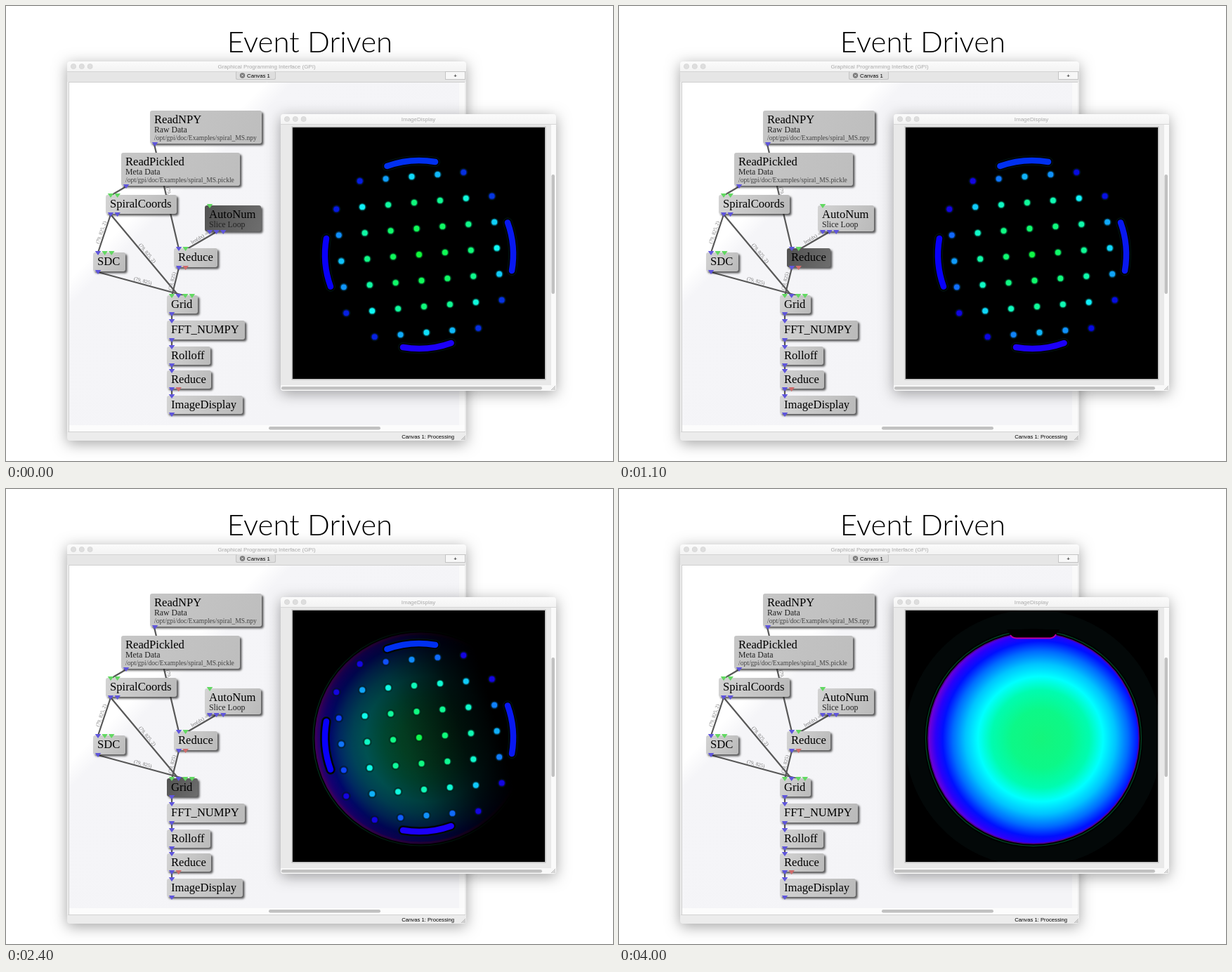
Write an HTML page with a canvas that moves like this. It is 864x648 px and loops after 4100 ms.

```html
<!DOCTYPE html>
<html lang="en">
<head>
<meta charset="utf-8">
<title>Event Driven</title>
<style>
  html, body { margin: 0; width: 864px; height: 648px; overflow: hidden; background: #fff; }
  canvas { display: block; }
</style>
</head>
<body>
<canvas id="stage" width="864" height="648"></canvas>
<script>
const ctx = document.getElementById('stage').getContext('2d');
const SANS = '"Liberation Sans", Arial, sans-serif';
const SERIF = '"Liberation Serif", "Times New Roman", serif';
const TAU = Math.PI * 2;

// Which node is busy in each 100 ms step (hex index into nodes), and when a new slice appears.
const STEP = 100, LOOP = 4100;
const busySteps = '356666789a' + '356666789aa' + '35666789a' + '356666789a' + '-';
const sliceStarts = [1000, 2100, 3000, 4000];

// x, y, width, height, title, subtitle, path
const nodes = [
  [205, 149, 159, 47, 'ReadNPY', 'Raw Data', '/opt/gpi/doc/Examples/spiral_MS.npy'],
  [164, 209, 169, 47, 'ReadPickled', 'Meta Data', '/opt/gpi/doc/Examples/spiral_MS.pickle'],
  [142, 269, 101, 27, 'SpiralCoords'],
  [283, 284, 80, 37, 'AutoNum', 'Slice Loop'],
  [124, 351, 46, 27, 'SDC'],
  [239, 345, 62, 27, 'Reduce'],
  [229, 412, 44, 26, 'Grid'],
  [229, 448, 111, 27, 'FFT_NUMPY'],
  [229, 485, 62, 26, 'Rolloff'],
  [229, 519, 63, 26, 'Reduce'],
  [229, 555, 108, 26, 'ImageDisplay']
];

// Ports per node: inputs on top, outputs below; p purple, g green, r red
const ports = [
  ['', 'p'], ['', 'p'], ['gg', 'pp'], ['g', 'ppp'], ['pgg', 'p'], ['pg', 'pr'],
  ['gpgg', 'p'], ['p', 'p'], ['p', 'p'], ['p', 'pr'], ['p', 'p']
];
const portColors = { p: '#5f55dc', g: '#62d862', r: '#cf6b6b' };

const edges = [
  [211, 197, 246, 346, '(79, 825)'],
  [171, 257, 149, 270],
  [149, 297, 131, 351, '(79, 825, 2)'],
  [149, 297, 246, 413, '(79, 825, 2)'],
  [131, 379, 256, 413, '(79, 825)'],
  [246, 373, 236, 413, '(79, 825)'],
  [299, 322, 256, 347, 'len(dx) ='],
  [236, 438, 236, 582]
];

function rect(x, y, w, h, fill, radius = 0) {
  ctx.beginPath();
  ctx.roundRect(x, y, w, h, radius);
  ctx.fillStyle = fill;
  ctx.fill();
}

function circle(x, y, r, fill) {
  ctx.beginPath();
  ctx.arc(x, y, r, 0, TAU);
  ctx.fillStyle = fill;
  ctx.fill();
}

function text(str, x, y, font, fill = '#000', align = 'left') {
  ctx.font = font;
  ctx.fillStyle = fill;
  ctx.textAlign = align;
  ctx.fillText(str, x, y);
}

function line(x1, y1, x2, y2, color, width) {
  ctx.beginPath();
  ctx.moveTo(x1, y1);
  ctx.lineTo(x2, y2);
  ctx.strokeStyle = color;
  ctx.lineWidth = width;
  ctx.stroke();
}

function linear(x1, y1, x2, y2, stops) {
  const g = ctx.createLinearGradient(x1, y1, x2, y2);
  stops.forEach(([at, color]) => g.addColorStop(at, color));
  return g;
}

function withShadow(color, blur, dx, dy, draw) {
  ctx.save();
  ctx.shadowColor = color;
  ctx.shadowBlur = blur;
  ctx.shadowOffsetX = dx;
  ctx.shadowOffsetY = dy;
  draw();
  ctx.restore();
}

function windowFrame(x, y, w, h, title) {
  withShadow('rgba(0,0,0,.36)', 20, 0, 4, () => rect(x, y, w, h, '#ececec', 4));
  rect(x, y, w, 14, linear(0, y, 0, y + 14, [[0, '#fbfbfb'], [1, '#f3f3f3']]), [4, 4, 0, 0]);
  for (let i = 0; i < 3; i++) {
    circle(x + 9 + i * 11.8, y + 7, 3.8, '#cfcfcf');
    circle(x + 9 + i * 11.8, y + 7, 3.2, '#dedede');
  }
  text(title, x + w / 2, y + 10, '8px ' + SANS, '#aaa', 'center');
}

function grip(x, y) {
  for (let i = 2; i <= 6; i += 2) line(x - i, y, x, y - i, '#999', .7);
}

function mainWindow() {
  windowFrame(87, 79, 568, 540, 'Graphical Programming Interface (GPI)');
  rect(87, 93, 568, 15, '#e6e6e6');
  line(87, 93.5, 655, 93.5, '#d4d4d4', 1);
  rect(327, 93, 57, 12, '#c4c4c4', 2);
  rect(328, 93, 55, 11, '#dedede', 2);
  circle(336.5, 99, 3.7, '#777');
  line(335, 97.5, 338, 100.5, '#eee', .9);
  line(338, 97.5, 335, 100.5, '#eee', .9);
  text('Canvas 1', 343, 101.5, '7.8px ' + SANS);
  rect(625, 93, 29, 12, '#c4c4c4');
  rect(626, 94, 27, 10, '#f7f7f7');
  text('+', 639.5, 102, '8px ' + SANS, '#000', 'center');

  rect(90, 108, 563, 498, linear(90, 108, 480, 498, [[0, '#fff'], [.36, '#fff'], [.41, '#f5f5f8'], [1, '#f4f4f7']]));
  line(90, 108.5, 653, 108.5, '#cfcfcf', 1);
  line(89.5, 108, 89.5, 606, '#d0d0d0', 1);
  rect(645, 109, 8, 497, '#fafafa');
  rect(90, 597, 563, 9, '#fcfcfc');
  rect(374, 599, 159, 4.5, '#c1c1c1', 2.2);
  line(88, 606.5, 654, 606.5, '#d2d2d2', 1);
  text('Canvas 1: Processing', 638, 616, '7.7px ' + SANS, '#000', 'right');
  grip(654, 618);
}

function edge([x1, y1, x2, y2, label]) {
  line(x1, y1, x2, y2, '#585858', 2.2);
  if (!label) return;
  let angle = Math.atan2(y2 - y1, x2 - x1);
  if (Math.abs(angle) > Math.PI / 2) angle -= Math.PI;
  ctx.save();
  ctx.translate((x1 + x2) / 2, (y1 + y2) / 2);
  ctx.rotate(angle);
  text(label, 0, -2.5, '7.2px ' + SERIF, '#777', 'center');
  ctx.restore();
}

function port(x, y, color) {
  ctx.beginPath();
  ctx.moveTo(x - 4.3, y - 2.5);
  ctx.lineTo(x + 4.3, y - 2.5);
  ctx.lineTo(x, y + 3.5);
  ctx.fillStyle = color;
  ctx.fill();
}

function node([x, y, w, h, title, subtitle, path], index, busy) {
  const shades = busy ? ['#525252', '#6e6e6e'] : path ? ['#c6c6c6', '#bebebe'] : ['#d3d3d3', '#bababa'];
  const fill = linear(x, y, x + w, y + h, [[0, shades[0]], [1, shades[1]]]);
  withShadow('rgba(30,30,30,.75)', 3, 2.5, 2.5, () => rect(x, y, w, h, fill, 3));
  text(title, x + 6, y + 18, '16.6px ' + SERIF);
  if (subtitle) text(subtitle, x + 6, y + 30.5, '11.8px ' + SERIF, '#222');
  if (path) text(path, x + 6, y + 41.5, '9.57px ' + SERIF, '#444');
  ports[index].forEach((row, bottom) =>
    [...row].forEach((kind, i) => port(x + 7 + i * 9.6, y + (bottom ? h + .5 : .5), portColors[kind])));
}

// Radius from the centre -> hue
const hueCurve = [[0, 130], [75, 148], [105, 175], [118, 200], [130, 227], [146, 242], [300, 242]];
function hueAt(r) {
  const i = hueCurve.findIndex(p => p[0] > r);
  const [r0, h0] = hueCurve[i - 1], [r1, h1] = hueCurve[i];
  return h0 + (h1 - h0) * (r - r0) / (r1 - r0);
}

const CX = 588, CY = 354;

function phantom(slice) {
  const shift = [0, 10, 20][slice];
  ctx.lineCap = 'round';
  ['#0030f0', '#0818f0', '#1c00f8', '#0800fa'].forEach((color, i) => {
    const mid = (-95 + i * 90) * TAU / 360;
    for (const [width, stroke] of [[14, '#02150f'], [12, '#000008'], [8.5, color]]) {
      ctx.beginPath();
      ctx.arc(CX, CY, 134, mid - .26, mid + .26);
      ctx.lineWidth = width;
      ctx.strokeStyle = stroke;
      ctx.stroke();
    }
  });
  ctx.lineCap = 'butt';
  for (let row = -3; row <= 3; row++) {
    const reach = Math.abs(row) === 3 ? 2 : 3;
    for (let col = -reach; col <= reach; col++) {
      const x = CX + col * 36.9 + row * 3.5, y = CY - col * 3.1 + row * 37;
      const r = Math.hypot(x - CX - 4, y - CY);
      const hue = Math.min(244, hueAt(r) + shift * Math.min(1, .25 + r / 140));
      const light = r > 128 ? 45 : 52;
      circle(x, y, 6.3, 'rgba(0,28,24,.6)');
      circle(x, y, 5.2, `hsl(${hue} 95% 20%)`);
      circle(x, y, 3.9, `hsl(${hue} 95% ${light}%)`);
    }
  }
}

// Smooth disc; core is the radius share of the green centre
function disc(core) {
  const g = ctx.createRadialGradient(600, 356, 0, 600, 356, 162);
  [[0, '#14f57c'], [core * .6, '#0cf888'], [core, '#00fcb0'], [.55, '#00ffff'], [.66, '#00c4ff'],
   [.77, '#006cff'], [.86, '#0010ff'], [.92, '#2a00fa'], [.97, '#6400dc'], [1, '#9000c0']]
    .forEach(([at, color]) => g.addColorStop(at, color));
  circle(590, 355, 150, g);
}

function ring(r, color, width) {
  ctx.beginPath();
  ctx.arc(590, 355, r, 0, TAU);
  ctx.strokeStyle = color;
  ctx.lineWidth = width;
  ctx.stroke();
}

function partialDisc() {
  ctx.globalAlpha = .48;
  disc(.38);
  ctx.globalAlpha = 1;
  ring(149, '#3c0060', 3);
  ring(153, '#00301c', 1.2);
  rect(408, 173, 359, 358, linear(445, 395, 695, 325,
    [[0, 'rgba(0,0,0,0)'], [.22, 'rgba(0,0,0,.3)'], [.5, 'rgba(0,0,0,.5)'], [.8, 'rgba(0,0,0,.86)'], [1, '#000']]));
}

function fullDisc(slice) {
  circle(590, 355, 183, '#030808');
  circle(590, 355, 156, '#000');
  disc(slice === 3 ? .38 : .43);
  ring(150, '#500098', 1.6);
  ring(153.5, '#004424', 1.3);
  // Notch in the top rim
  ctx.beginPath();
  ctx.moveTo(552, 200);
  ctx.lineTo(557, 208);
  ctx.quadraticCurveTo(560, 212, 566, 212);
  ctx.lineTo(614, 212);
  ctx.quadraticCurveTo(619, 212, 622, 207);
  ctx.lineTo(627, 200);
  ctx.fillStyle = '#000';
  ctx.fill();
  ctx.strokeStyle = '#c000a0';
  ctx.lineWidth = 1.8;
  ctx.beginPath();
  ctx.moveTo(557, 208);
  ctx.quadraticCurveTo(560, 212.5, 566, 212.5);
  ctx.lineTo(614, 212.5);
  ctx.quadraticCurveTo(619, 212, 622, 207);
  ctx.stroke();
}

function imageWindow(slice) {
  windowFrame(391, 154, 392, 394, 'ImageDisplay');
  line(391, 168.5, 783, 168.5, '#d6d6d6', 1);
  rect(391, 169, 385, 371, '#e9e9e9');
  rect(776, 169, 7, 371, '#fafafa');
  rect(391, 540, 392, 8, '#f8f8f8', [0, 0, 4, 4]);
  rect(776.5, 240, 4.5, 170, '#c1c1c1', 2.2);
  rect(392, 542, 371, 4.5, '#c1c1c1', 2.2);
  grip(782, 547);
  rect(406.5, 171.5, 362, 361, '#bdbdbd');
  ctx.save();
  ctx.beginPath();
  ctx.rect(408, 173, 359, 358);
  ctx.clip();
  rect(408, 173, 359, 358, '#000');
  if (slice < 3) {
    if (slice === 2) partialDisc();
    phantom(slice);
  } else {
    fullDisc(slice);
  }
  ctx.restore();
}

function render(time) {
  const t = time % LOOP;
  const busy = parseInt(busySteps[Math.floor(t / STEP)], 16);
  const slice = sliceStarts.filter(start => t >= start).length;
  rect(0, 0, 864, 648, '#fff');
  text('Event Driven', 432.5, 66, '300 42px Lato, sans-serif', '#000', 'center');
  mainWindow();
  edges.forEach(edge);
  nodes.forEach((n, i) => node(n, i, i === busy));
  imageWindow(slice);
}

let start;
function tick(now) {
  start ??= now;
  render(now - start);
  requestAnimationFrame(tick);
}
render(0);
requestAnimationFrame(tick);
</script>
</body>
</html>
```
